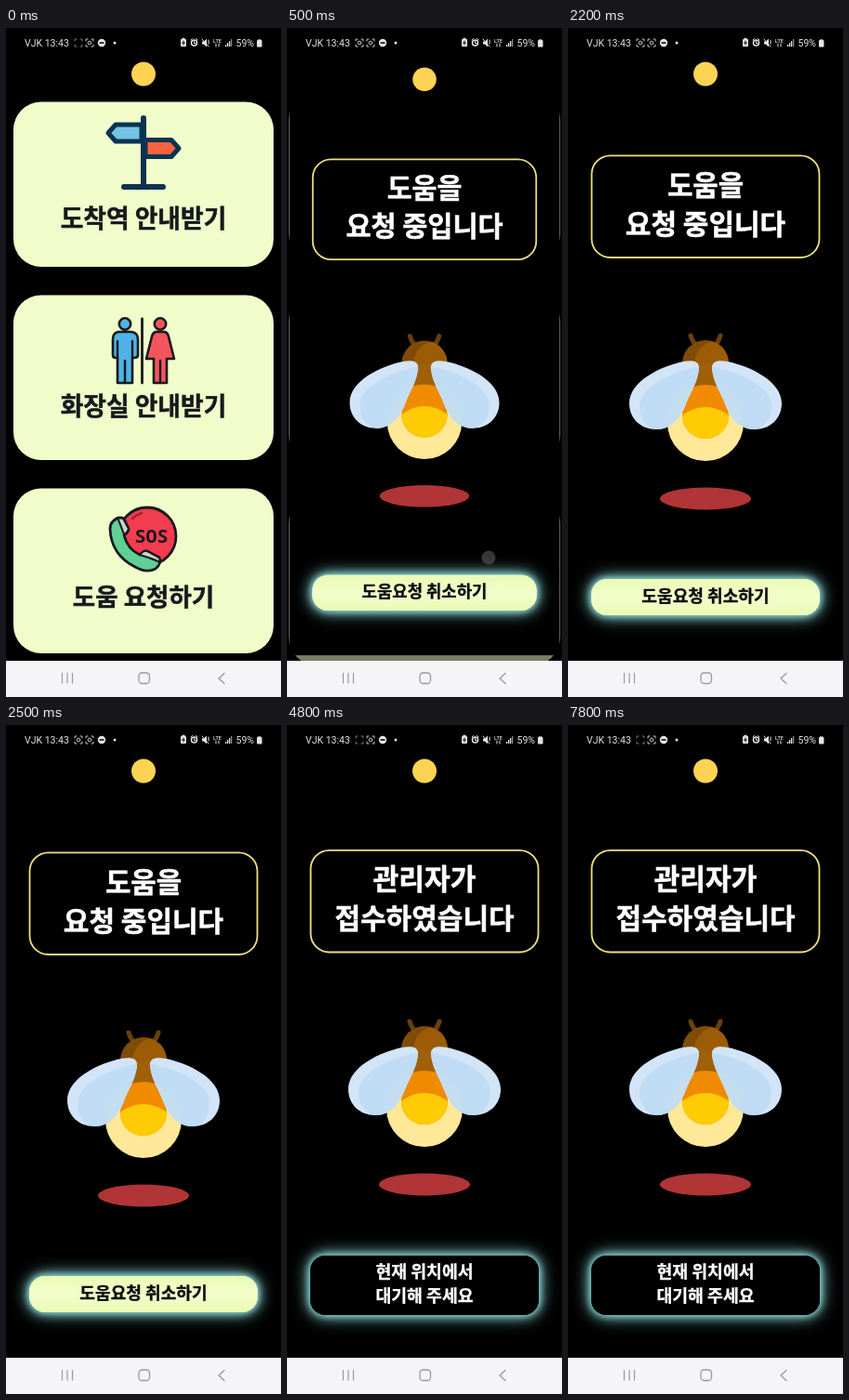
Write an HTML page with a canvas that moves like this. It is 296 by 720 pixels and loops after 8 s.

```html
<!DOCTYPE html>
<html lang="ko">
<head>
<meta charset="utf-8">
<title>도움 요청</title>
<style>
html, body { margin: 0; width: 100%; height: 100%; overflow: hidden; background: #000; }
canvas { display: block; width: 296px; height: 720px; }
</style>
</head>
<body>
<canvas id="stage" width="296" height="720"></canvas>
<script>
const ctx = document.getElementById('stage').getContext('2d');
const LOOP = 8000, STEP = 100;
const OPEN_AT = 395, ACCEPT_AT = 3000;
const CREAM = '#f0fdca', INK = '#17191c', NAVY = '#0b3351';
const KOREAN = '"Noto Sans CJK KR", "Noto Sans CJK", "Noto Sans CJK JP", sans-serif';
const LATIN = 'Roboto, Inter, sans-serif';

function paint(fill, stroke, width = 2) {
  if (fill) { ctx.fillStyle = fill; ctx.fill(); }
  if (stroke) { ctx.strokeStyle = stroke; ctx.lineWidth = width; ctx.stroke(); }
}
function round(x, y, w, h, r, fill, stroke, width) {
  ctx.beginPath();
  ctx.roundRect(x, y, w, h, r);
  paint(fill, stroke, width);
}
function oval(x, y, rx, ry, fill, stroke, width) {
  ctx.beginPath();
  ctx.ellipse(x, y, rx, ry, 0, 0, Math.PI * 2);
  paint(fill, stroke, width);
}
function shape(d, fill, stroke, width) {
  const p = new Path2D(d);
  if (fill) { ctx.fillStyle = fill; ctx.fill(p); }
  if (stroke) { ctx.strokeStyle = stroke; ctx.lineWidth = width; ctx.stroke(p); }
}
function label(str, x, y, font, color, align = 'left') {
  ctx.font = font;
  ctx.fillStyle = color;
  ctx.textAlign = align;
  ctx.fillText(str, x, y);
}
// Korean text centred on (148, cy), a little heavier than bold
function korean(str, cy, size, color) {
  const y = cy + size * 0.37;
  label(str, 148, y, `700 ${size}px ${KOREAN}`, color, 'center');
  ctx.strokeStyle = color;
  ctx.lineWidth = size * 0.018;
  ctx.strokeText(str, 148, y);
}
function zoomed(scale, draw) {
  ctx.save();
  ctx.translate(148, 360);
  ctx.scale(scale, scale);
  ctx.translate(-148, -360);
  draw();
  ctx.restore();
}
function mirrored(draw) {
  draw();
  ctx.save();
  ctx.translate(296, 0);
  ctx.scale(-1, 1);
  draw();
  ctx.restore();
}

function pageBase() {
  ctx.fillStyle = '#000';
  ctx.fillRect(0, 0, 296, 681);
  oval(148, 49.5, 13, 13, '#fcd352');
}

function signpost() {
  shape('M148 97V171M127 171H169', null, NAVY, 6);
  shape('M146 104H118L110 113L118 122H146Z', '#74c4e2', NAVY, 5);
  shape('M150 120.500H178L186 129.500L178 138.500H150Z', '#f9623f', NAVY, 5);
  shape('M148 98V171', null, NAVY, 6);
}

function restroom() {
  const blue = '#4fb3e6', red = '#f4555c';
  oval(128, 318.5, 6.2, 6.2, blue, INK, 2.6);
  shape('M121 327H135Q142 328 142 335V352Q142 355 138 355H136V382H120V355H118Q115 355 115 352V335Q115 328 121 327Z', blue, INK, 2.6);
  shape('M120 337V355M136 337V355M128 358V382', null, INK, 2.4);
  shape('M146.500 313V382', null, INK, 2.8);
  oval(166, 318.5, 6.2, 6.2, red, INK, 2.6);
  shape('M161 327H171Q174 328 175 332L181 356H173V382H159V356H151L157 332Q158 328 161 327Z', red, INK, 2.6);
  shape('M166 358V382', null, INK, 2.4);
}

function sosPhone() {
  oval(152, 547, 31, 31, '#f23c4f', INK, 2.8);
  shape('M136 528Q140 524 146 522', null, '#a81f33', 2.5);
  label('SOS', 156.5, 554, '700 20px "Noto Sans Mono", "DejaVu Sans Mono", monospace', INK, 'center');
  const handset = 'M115 531Q121 525 127 528L132 539Q132 543 127 546Q131 561 144 567Q148 562 152 563L165 570Q168 576 161 582Q151 587 139 580Q113 567 112 539Q112 534 115 531Z';
  shape(handset, '#5fcf94', INK, 2.8);
  shape('M120 527L126 528L132 539Q131 543 127 545Q123 534 120 527Z', '#c9d3d4', INK, 2);
  shape('M144 567Q148 562 152 563L165 570L166 575Q155 570 144 567Z', '#c9d3d4', INK, 2);
}

function menuPage() {
  pageBase();
  for (let i = 0; i < 3; i++) round(8, 79.5 + i * 208, 280, 177.5, 30, CREAM);
  signpost();
  restroom();
  sosPhone();
  korean('도착역 안내받기', 205.5, 26.8, INK);
  korean('화장실 안내받기', 407.5, 26.8, INK);
  korean('도움 요청하기', 612.5, 26.5, INK);
}

function wing() {
  const outer = new Path2D('M141 367C142 358 134 357 124 359C100 364 66 380 66 404C66 421 79 432 95 432C112 432 121 419 126 407C132 391 139 383 141 367Z');
  ctx.fillStyle = '#d2e4f8';
  ctx.fill(outer);
  ctx.save();
  ctx.clip(outer);
  shape('M144 364C116 369 76 384 77 409C78 425 87 430 97 433L150 430Z', '#bfdcf4');
  oval(148, 425, 41, 41, 'rgba(255,240,190,.08)');
  ctx.restore();
}

function firefly() {
  mirrored(() => shape('M138.500 342Q134 338 132 331', null, '#6b3f0c', 5));
  oval(148, 425, 41, 41, '#ffe898');

  oval(148, 361, 25, 25, '#804b05');
  ctx.save();
  ctx.beginPath();
  ctx.arc(148, 361, 25, 0, Math.PI * 2);
  ctx.clip();
  oval(159, 362, 23, 25, '#9c5c06');
  ctx.restore();

  const body = new Path2D('M134 362H162C162 382 173 400 173 417C173 431 162 442 148 442C134 442 123 431 123 417C123 400 134 382 134 362Z');
  ctx.save();
  ctx.clip(body);
  ctx.fillStyle = '#a06007';
  ctx.fillRect(120, 360, 56, 30);
  oval(148, 425, 41, 41, '#f08a00');
  oval(148, 433, 32, 25, '#ffcb05');
  ctx.restore();

  mirrored(wing);
  oval(148, 506.5, 49, 12, '#b13436');
}

function glowBox(y, h, r, fill) {
  ctx.save();
  ctx.shadowColor = '#86d0d0';
  for (const blur of [20, 12, 6]) {
    ctx.shadowBlur = blur;
    round(25, y, 246, h, r, fill);
  }
  ctx.restore();
}

function helpPage(accepted) {
  pageBase();
  round(25.5, accepted ? 134.8 : 137.3, 245, 109.7, 20, '#000', '#eee07c', 1.8);
  ctx.save();
  ctx.translate(0, accepted ? -12 : 0);
  firefly();
  ctx.restore();
  if (accepted) {
    korean('관리자가', 165.5, 30.2, '#fff');
    korean('접수하였습니다', 207.5, 30, '#fff');
    glowBox(571, 64, 16, '#000');
    korean('현재 위치에서', 588.5, 18.3, '#fff');
    korean('대기해 주세요', 614.5, 18.3, '#fff');
  } else {
    korean('도움을', 168.5, 29.8, '#fff');
    korean('요청 중입니다', 210.5, 30, '#fff');
    const fill = ctx.createLinearGradient(0, 593, 0, 632);
    fill.addColorStop(0, '#eafbb4');
    fill.addColorStop(0.5, '#f3fccb');
    fill.addColorStop(1, '#eafbb4');
    glowBox(593, 39, 17, fill);
    korean('도움요청 취소하기', 611.5, 18.1, '#0c0d0c');
  }
}

function scanIcon(x, bright) {
  const c = bright ? '#c4c4c4' : '#777';
  for (const dx of [0, 8]) for (const dy of [0, 8]) {
    const sx = dx ? -2 : 2, sy = dy ? -2 : 2;
    shape(`M${x + dx + sx} ${12 + dy}h${-sx}v${sy}`, null, c, 1);
  }
  if (bright) oval(x + 4, 16, 1.9, 1.9, null, c, 1);
}

function statusBar(t) {
  const white = '#e4e4e4', phase = t % 1000;
  label('VJK 13:43', 20, 19.5, `400 10.5px ${LATIN}`, white);
  scanIcon(74, phase >= 200 && phase < 700);
  scanIcon(86, true);
  oval(103, 16, 4.2, 4.2, white);
  shape('M101 16h4', null, '#000', 1.4);
  oval(117, 16, 1.5, 1.5, white);

  round(188, 12, 6, 8, 1, white);
  shape('M190 11.500h2', null, white, 1.5);
  shape('M191 14v4M189.500 16h3', null, '#000', 0.9);

  oval(202.5, 16, 3, 3, null, white, 1.5);
  shape('M199 13l1.500 -1.500M206 13l-1.500 -1.500M202.500 14.500v2h1.500', null, white, 1);

  shape('M211 14.500h2l3 -3v9l-3 -3h-2z', white);
  shape('M211 12l7 8M218 13v4', null, white, 1);

  label('LTE', 227.5, 15.5, `500 5.5px ${LATIN}`, white, 'center');
  shape('M226 17v3M229 17v3', null, white, 1);
  for (let i = 0; i < 4; i++) {
    ctx.fillStyle = i < 3 ? white : '#888';
    ctx.fillRect(236 + i * 2, 18 - i * 2, 1.3, 2 + i * 2);
  }
  label('59%', 247.5, 19.5, `400 10.5px ${LATIN}`, white);
  round(270, 13, 5.5, 7.5, 1, white);
  shape('M271.500 12.500h2.500', null, '#999', 1);
}

function navBar() {
  const grey = '#98999c';
  ctx.fillStyle = '#f5f5f7';
  ctx.fillRect(0, 681, 296, 39);
  for (let i = 0; i < 3; i++) shape(`M${60.5 + i * 5.5} 694.500v10.500`, null, grey, 1.2);
  round(143, 694, 11.5, 11.5, 3.5, null, grey, 1.3);
  shape('M235 694.500l-6 5.500l6 5.500', null, grey, 1.3);
}

function render(t) {
  ctx.fillStyle = '#000';
  ctx.fillRect(0, 0, 296, 720);
  const opening = t > OPEN_AT + STEP / 10;
  const ease = t >= 700 ? 1 : 1 - Math.exp((OPEN_AT - t) / 50);

  if (!opening) menuPage();
  else {
    if (ease < 1) {
      zoomed(1 + 0.05 * ease, menuPage);
      ctx.fillStyle = 'rgba(0,0,0,.5)';
      ctx.fillRect(0, 0, 296, 681);
    }
    zoomed(0.85 + 0.15 * ease, () => helpPage(t >= ACCEPT_AT));
  }
  if (t >= 300 && t < 700) oval(217, 570, 7.5, 7.5, 'rgba(90,90,90,.6)');
  statusBar(t);
  navBar();
}

// Ten steps a second; one step in each second is held twice as long.
function stepTime(now) {
  const t = Math.floor((now % LOOP) / STEP) * STEP;
  return t % 1000 === 600 ? t - STEP : t;
}

ctx.lineCap = ctx.lineJoin = 'round';
const start = performance.now();
function tick() {
  render(stepTime(performance.now() - start));
  requestAnimationFrame(tick);
}
tick();
</script>
</body>
</html>
```
